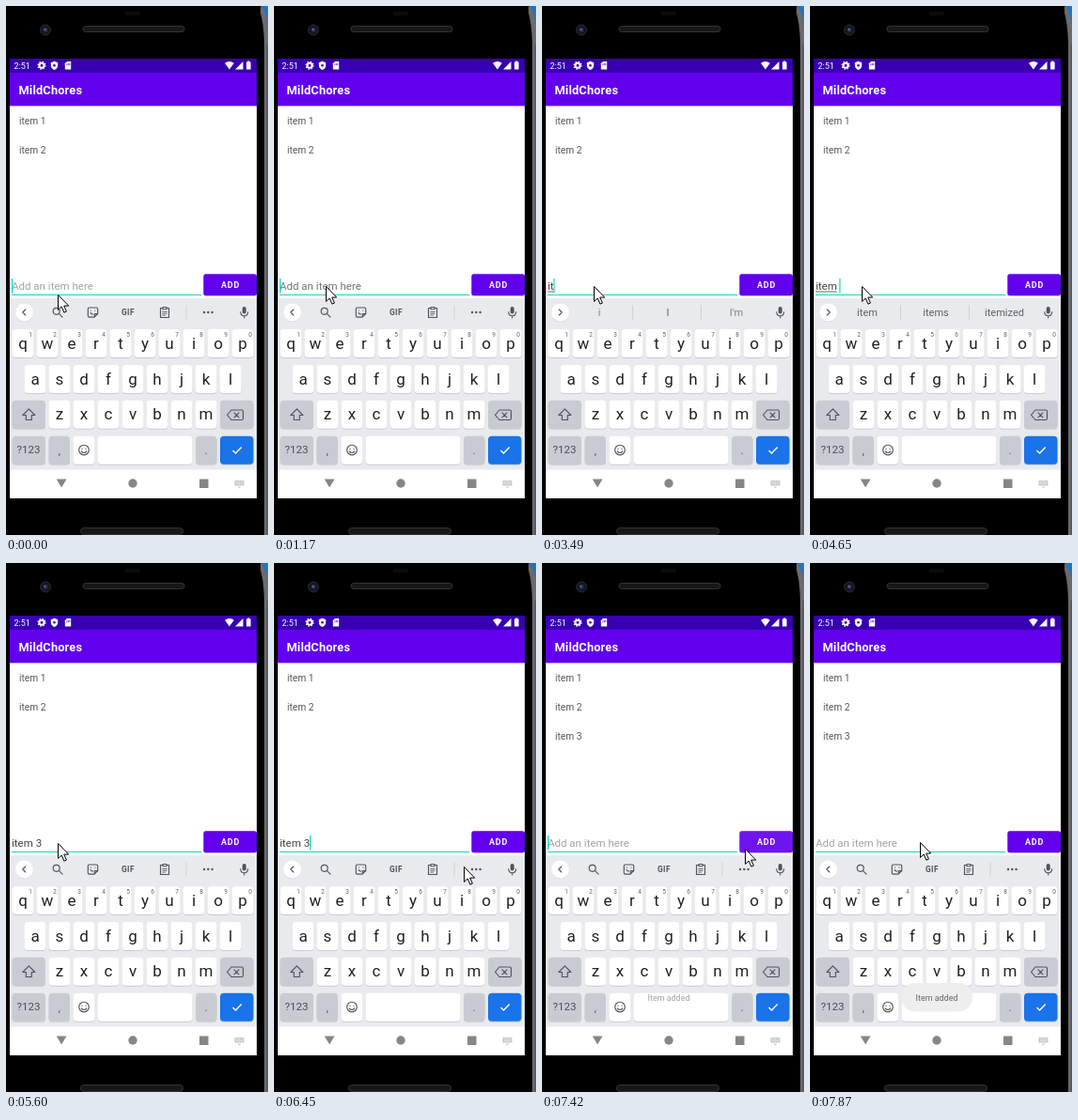
An HTML page for the animation above (8 s loop, 279 px wide and 563 px high).

```html
<!DOCTYPE html>
<html lang="en">
<head>
<meta charset="utf-8">
<title>To-do list demo</title>
<style>
html, body { margin: 0; width: 100%; height: 100%; overflow: hidden; background: #000; }
svg { display: block; width: 279px; height: 563px; font-family: Roboto, "Open Sans", sans-serif; }
text { white-space: pre; }
.mid { text-anchor: middle; }
.line { fill: none; stroke: #50545a; stroke-width: 1.15; stroke-linecap: round; stroke-linejoin: round; }
.list { font-size: 10.24px; fill: #555; }
.entry { font-size: 11.52px; fill: #444; }
.letter { font-size: 17px; fill: #202124; }
.digit { font-size: 6.5px; fill: #5f6368; }
.suggest { font-size: 11px; fill: #5f6368; }

/* one loop = 8000 ms, so 1% = 80 ms */
#pointer, #caret, #compose, #hint, #press, #toast, #pill { animation: 8s step-end infinite; }
#pointer { animation-name: pointer; }
#caret { animation-name: blink, advance; }
#compose { animation-name: compose; }
#hint { animation-name: tap; }
#press { animation-name: press; }
#toast { animation-name: toast; }
#pill { animation-name: pill; }

@keyframes pointer {
  0% { transform: translate(55px, 307px); }
  12.875% { transform: translate(55px, 302px); }
  14.625% { transform: translate(55px, 298px); }
  78.125% { transform: translate(150px, 326px); }
  80.625% { transform: translate(202px, 323px); }
  82.5% { transform: translate(212px, 312px); }
  84.375%, 92.75% { transform: translate(216px, 304px); }
  94.625% { transform: translate(198px, 302px); }
  96.5% { transform: translate(150px, 299px); }
  98.375%, 100% { transform: translate(117px, 297px); }
}
@keyframes blink {
  0%, 11.25%, 30%, 38.375%, 75.625%, 89% { opacity: 1; }
  5.75%, 25%, 36.75%, 70%, 82.5%, 96.5%, 100% { opacity: 0; }
}
@keyframes advance {
  0%, 90.875%, 100% { transform: none; }
  38.375% { transform: translateX(2.8px); }
  43.625% { transform: translateX(6.3px); }
  48.625% { transform: translateX(12.6px); }
  50.5% { transform: translateX(22.6px); }
  58.125% { transform: translateX(25.3px); }
  63.5% { transform: translateX(32px); }
}
@keyframes compose {
  0%, 60%, 100% { width: 0; }
  38.375% { width: 2.8px; }
  43.625% { width: 6.5px; }
  48.625% { width: 12.7px; }
  54.375% { width: 22.7px; }
}
@keyframes tap {
  0%, 16.125%, 100% { fill: #a3a3a3; }
  14.625% { fill: #747474; }
}
@keyframes press {
  0%, 96.5%, 100% { opacity: 0; }
  89% { opacity: .08; }
  90.875% { opacity: .12; }
  92.75% { opacity: .08; }
  94.625% { opacity: .04; }
}
@keyframes toast {
  0% { opacity: 0; }
  90.875% { opacity: .15; }
  92.75% { opacity: .6; }
  94.625% { opacity: .8; }
  96.5% { opacity: .92; }
  98.375%, 100% { opacity: 1; }
}
@keyframes pill {
  0% { opacity: 0; }
  94.625% { opacity: .4; }
  96.5% { opacity: .75; }
  98.375%, 100% { opacity: 1; }
}
</style>
</head>
<body>
<svg viewBox="0 0 279 563">
  <!-- phone body -->
  <rect width="279" height="563" fill="#000"/>
  <rect x="272" width="7" height="40" fill="#1877c9"/>
  <path d="M271 0Q277.500 5 279 20V563H271z" fill="#6b6b6e"/>
  <path d="M277.500 40H279V563H277.500z" fill="#55565a"/>
  <path d="M268 0Q274.500 12 275 42V563H266V0z" fill="#000"/>
  <circle cx="42" cy="25.500" r="5.500" fill="#15161c" stroke="#2b2c33"/>
  <circle cx="42" cy="25.500" r="2.400" fill="#27305a"/>
  <circle cx="41.500" cy="25" r="1" fill="#6271b5"/>
  <rect x="127" y="6" width="16" height="4" rx="1.500" fill="#0d0d0d"/>
  <rect x="82" y="21.500" width="108" height="6" rx="3" fill="#171717" stroke="#343434"/>
  <rect x="79.500" y="555.500" width="109" height="7" rx="3.500" fill="#171717" stroke="#343434"/>

  <!-- app -->
  <rect x="4" y="72" width="263" height="452" fill="#fff"/>
  <rect x="4" y="56" width="263" height="15" fill="#3700b3"/>
  <rect x="4" y="71" width="263" height="35" fill="#6200ee"/>
  <rect x="4" y="106" width="263" height="1" fill="#b8a0dc"/>
  <g fill="#fff">
    <text x="8.500" y="66.700" font-size="9">2:51</text>
    <circle cx="38" cy="63.300" r="2.500" fill="none" stroke="#fff" stroke-width="2"/>
    <circle cx="38" cy="63.300" r="3.900" fill="none" stroke="#fff" stroke-width="1.300" stroke-dasharray="1.550 1.513"/>
    <path d="M51.500 58.800l3.700 1.500v2.600q0 3.700-3.700 5-3.700-1.300-3.700-5v-2.600z"/>
    <circle cx="51.500" cy="63.200" r="1.300" fill="#3700b3"/>
    <path d="M65 59h4.200v8.600h-6.400v-6.300z"/>
    <path d="M64.800 61.500v1.700M66.300 61v2.200M67.800 61v2.200" stroke="#3700b3" stroke-width=".7"/>
    <path d="M233 60.700q4.900-3.600 9.800 0l-4.900 6.700z"/>
    <path d="M252.500 59v8.400h-8.400z"/>
    <path d="M256 59.500h1.300v-.9h2v.9h1.300v8H256z"/>
    <text x="13.500" y="93.700" font-size="12.800" font-weight="600" letter-spacing=".16">MildChores</text>
  </g>
  <g class="list">
    <text x="14" y="126.400">item 1</text>
    <text x="14" y="157">item 2</text>
    <text x="14" y="187.700" id="added">item 3</text>
  </g>
  <g id="empty"><text id="hint" class="entry" x="6" y="302">Add an item here</text></g>
  <text id="entry" class="entry" x="6" y="302"></text>
  <rect id="compose" x="6" y="303.500" width="0" height="1" fill="#666"/>
  <rect x="6" y="307" width="202" height="1" fill="#1fd0bf"/>
  <rect id="caret" x="6" y="290" width="1.200" height="15.500" fill="#03dac5"/>
  <rect x="210.500" y="286" width="56.500" height="23" rx="2.500" fill="#dfdfe4"/>
  <rect x="210.300" y="285.300" width="56.700" height="23" rx="2.500" fill="#6200ee"/>
  <rect id="press" x="210.300" y="285.300" width="56.700" height="23" rx="2.500" fill="#fff"/>
  <text class="mid" x="239" y="300.200" font-size="8.960" font-weight="700" letter-spacing=".75" fill="#fff">ADD</text>

  <!-- keyboard -->
  <rect x="4" y="311" width="263" height="182.500" fill="#e8eaed"/>
  <circle cx="19.500" cy="326.600" r="9.700" fill="#d6d9dc"/>
  <circle cx="19.500" cy="326" r="9.600" fill="#fff"/>
  <path id="expand" class="line" d="M18.200 323l3 3-3 3"/>
  <g id="tools" class="line">
    <path d="M20.800 323l-3 3 3 3"/>
    <circle cx="53.700" cy="324.800" r="3.500"/><path d="M56.300 327.400l3.700 3.700"/>
    <path d="M88.700 321h7.600q1.400 0 1.400 1.400v5.100l-3.600 3.600h-5.400q-1.400 0-1.400-1.400v-7.300q0-1.400 1.400-1.400zM94.300 330.800v-3.200h3.200"/>
    <path d="M90.500 324h.01M94.800 324h.01M90 326.700q1 1.300 2.500 1.300"/>
    <text class="mid" x="130" y="329" font-size="8.300" font-weight="700" letter-spacing=".5" fill="#50545a" stroke="none">GIF</text>
    <path d="M166.500 321.500H164.500V331.500H173.500V321.500H171.500M167 320.500h4v2.200h-4z"/>
    <path d="M166.800 325.500h4.400M166.800 327.300h4.400M166.800 329.100h2.700" stroke-width=".8"/>
    <path d="M192 319v14" stroke="#d0d3d7" stroke-width="1"/>
    <path d="M211 326h.01M215.300 326h.01M219.600 326h.01" stroke-width="2.400"/>
  </g>
  <g id="bar"></g>
  <rect x="251.700" y="320" width="4" height="7.500" rx="2" fill="#50545a"/>
  <path class="line" d="M249.700 325.700q.3 4 4 4t4-4M253.700 329.700v2.300"/>
  <g id="keys"></g>
  <path class="line" d="M24.300 428.800l6.500 6.700h-3.500v5h-6v-5h-3.500z"/>
  <path class="line" d="M240 430h11q1.500 0 1.500 1.500v7.500q0 1.500-1.500 1.500h-11l-4.500-5.250zM243 432.800l5 5M248 432.800l-5 5"/>
  <text class="mid" x="24" y="476.300" font-size="11.500" fill="#4a4e53">?123</text>
  <g class="mid" font-size="13" fill="#5f6368">
    <text x="56.700" y="477">,</text>
    <text x="213" y="477">.</text>
  </g>
  <circle class="line" cx="83" cy="472.500" r="5.300"/>
  <path class="line" d="M81 471v.3M85 471v.3M80.300 474q2.700 2.900 5.400 0"/>
  <path d="M241.500 473l3 3 6.300-6.500" fill="none" stroke="#fff" stroke-width="1.400"/>

  <!-- navigation bar -->
  <g fill="#868686">
    <path d="M53.700 503.500h10.800l-5.400 9z"/>
    <circle cx="135" cy="508" r="4.700"/>
    <rect x="206" y="503.500" width="9.500" height="9.500"/>
  </g>
  <rect x="243.500" y="505" width="10" height="5.500" rx=".7" fill="#c8c8c8"/>
  <path d="M245 506.700h7M245 508.600h7" stroke="#fff" stroke-width=".8" stroke-dasharray="1 .5"/>
  <path d="M246.700 511.700h3.600l-1.800 1.700z" fill="#c8c8c8"/>

  <rect id="pill" x="97" y="447" width="76" height="30.500" rx="15" fill="#eee"/>
  <text id="toast" class="mid" x="135" y="465.500" font-size="8.960" fill="#666">Item added</text>
  <path id="pointer" d="M.5 .5v16l3.700-3.500 2.700 6.200 2.500-1.100-2.700-6h5z" fill="#fff" stroke="#000" stroke-width="1"/>
</svg>
<script>
const LOOP = 8000;
const $ = id => document.getElementById(id);
const rules = [];

// Makes an element visible only during the given [from, to] spans.
function show(el, ...spans) {
  const name = "show" + rules.length;
  const frame = (ms, state) => `${ms / LOOP * 100}% { visibility: ${state}; }`;
  let css = spans[0][0] > 0 ? frame(0, "hidden") : "";
  for (const [from, to] of spans) {
    css += frame(from, "visible") + frame(to, to < LOOP ? "hidden" : "visible");
  }
  if (spans.at(-1)[1] < LOOP) css += frame(LOOP, "hidden");
  rules.push(`@keyframes ${name} { ${css} }`);
  el.style.animation = `${name} ${LOOP}ms step-end infinite`;
}

function buildKeys() {
  const key = (x, y, w, fill = "#fff") =>
    `<rect x="${x}" y="${y + 1}" width="${w}" height="30" rx="4" fill="#c9ccd0"/>` +
    `<rect x="${x}" y="${y}" width="${w}" height="30" rx="4" fill="${fill}"/>`;
  const rows = [["qwertyuiop", 18, 344], ["asdfghjkl", 31, 382], ["zxcvbnm", 57, 419.7]];
  let out = "";
  for (const [letters, first, y] of rows) {
    [...letters].forEach((c, i) => {
      const x = first + 26 * i;
      out += key(x - 11.5, y, 23) + `<text class="letter mid" x="${x}" y="${y + 20.7}">${c}</text>`;
      if (letters.length === 10)
        out += `<text class="digit mid" x="${x + 8}" y="${y + 8}">${(i + 1) % 10}</text>`;
    });
  }
  const gray = "#c8ccd2";
  out += key(6.5, 419.7, 35.5, gray) + key(228, 419.7, 35.5, gray);
  out += key(6.5, 457.7, 35.5, gray) + key(45.5, 457.7, 22.5, gray) + key(71.5, 457.7, 23);
  out += key(97.5, 457.7, 101) + key(202, 457.7, 22.5, gray) + key(228, 457.7, 35.5, "#1a73e8");
  $("keys").innerHTML = out;
}

function buildTyping() {
  const pieces = [["i", 3070], ["t", 3490], ["e", 3890], ["m", 4040], [" 3", 5080]];
  $("entry").innerHTML = pieces.map(([s]) => `<tspan>${s}</tspan>`).join("");
  pieces.forEach(([, from], i) => show($("entry").children[i], [from, 7270]));
  show($("empty"), [0, 3070], [7270, LOOP]);
  show($("added"), [7270, LOOP]);
}

function buildSuggestions() {
  const sets = [
    ["i", "I", "I'm", 3200, 3610, .75], ["it", "it's", "its", 3610, 4350, 1],
    ["item", "items", "itemized", 4350, 4800, 1], ["is", "in", "for", 4800, 5330, 1]
  ];
  const word = (s, x, alpha) => `<text class="suggest mid" x="${x}" y="330" opacity="${alpha}">${s}</text>`;
  $("bar").innerHTML = `<path d="M96.500 318.500v15M169.500 318.500v15" stroke="#cdd0d4"/>` +
    sets.map(([a, b, c, , , alpha]) =>
      `<g>${word(a, 61, alpha)}${word(b, 134, 1)}${word(c, 207, alpha)}</g>`).join("");
  sets.forEach(([, , , from, to], i) => show($("bar").children[i + 1], [from, to]));
  show($("bar").children[0], [3200, 5330]);
  show($("expand"), [3200, 5330]);
  show($("tools"), [0, 3200], [5330, LOOP]);
}

buildKeys();
buildTyping();
buildSuggestions();
const sheet = document.createElement("style");
sheet.textContent = rules.join("\n");
document.head.append(sheet);
</script>
</body>
</html>
```
